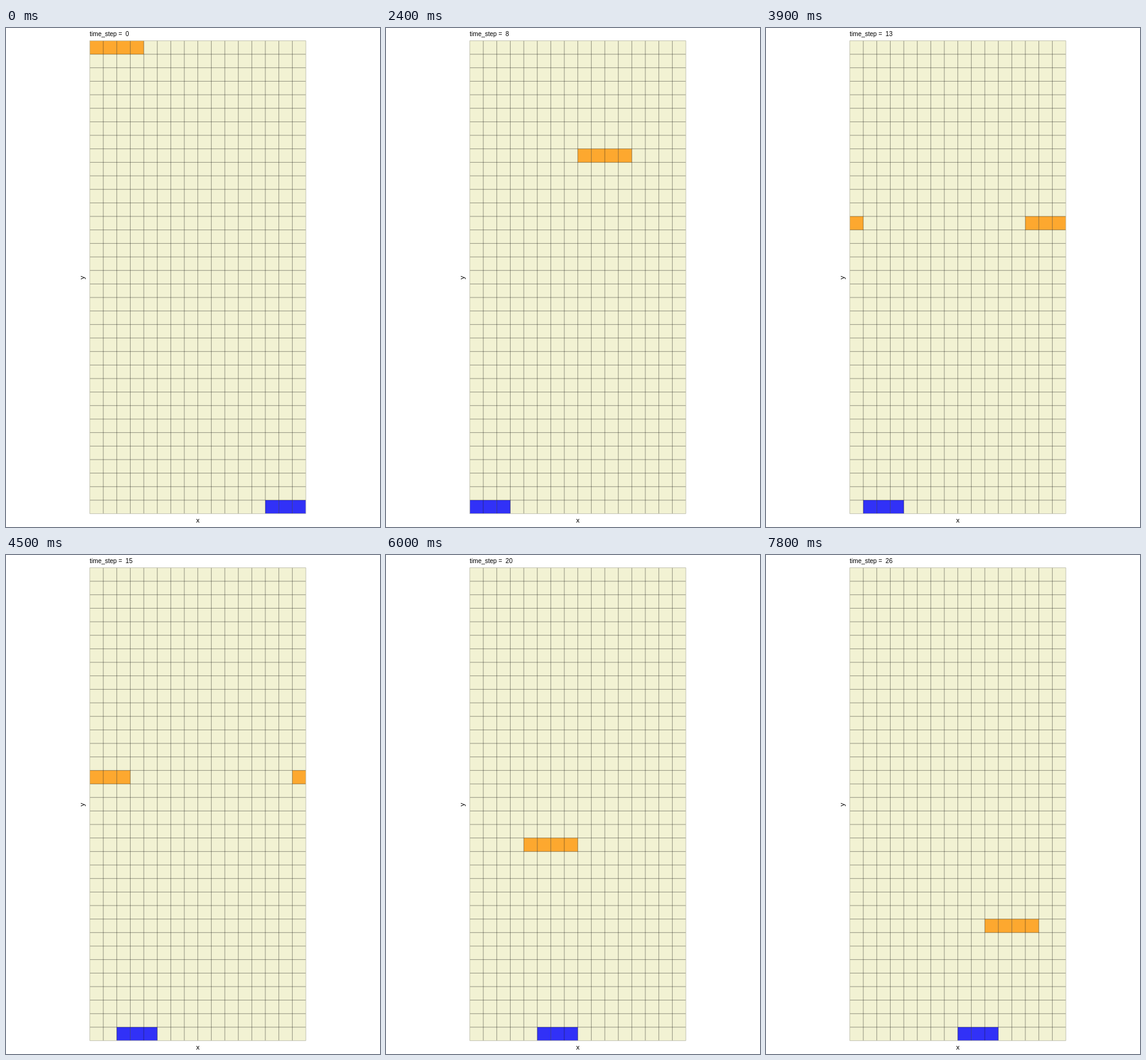
An HTML page for the animation above (8000 ms loop, 600x800 px).

```html
<!DOCTYPE html>
<html lang="en">
<head>
<meta charset="utf-8">
<title>Grid catch</title>
<style>
html, body { margin: 0; width: 100%; height: 100%; overflow: hidden; background: #fff; }
svg { display: block; width: 600px; height: 800px; }
text { font-family: "Liberation Sans", Arial, sans-serif; fill: #000; white-space: pre; }
</style>
</head>
<body>
<svg viewBox="0 0 600 800">
  <text id="label" x="134.3" y="13" font-size="10" xml:space="preserve"></text>
  <g id="cells"></g>
  <path id="grid" fill="none" stroke="#000" stroke-opacity=".42" stroke-width=".9"/>
  <path id="frame" fill="none" stroke="#b9b9a8" stroke-width=".8"/>
  <text x="307.7" y="793" font-size="11" text-anchor="middle">x</text>
  <text transform="translate(126 400.2) rotate(-90)" font-size="11" text-anchor="middle">y</text>
</svg>
<script>
const COLS = 16, ROWS = 35, SIZE = 21.664, LEFT = 134.4, TOP = 20.4;
const STEP = 300, LOOP = 8000;
const BALL = 4, PADDLE = 3;
// Paddle position at each step, wrapping at the grid width
const PATH = [13, 14, 15, 16, 16, 16, 16, 16, 16, 16, 16, 16, 17, 17, 18,
  18, 18, 19, 19, 20, 21, 21, 22, 22, 23, 23, 24];

const $ = id => document.getElementById(id);
const px = col => LEFT + col * SIZE;
const py = row => TOP + row * SIZE;

function addRect(fill, x, y, w, h) {
  const r = document.createElementNS("http://www.w3.org/2000/svg", "rect");
  const attrs = { fill, x, y, width: w, height: h };
  for (const k in attrs) r.setAttribute(k, attrs[k]);
  $("cells").append(r);
  return r;
}

function place(cells, col, row) {
  cells.forEach((cell, i) => {
    cell.setAttribute("x", px((col + i) % COLS));
    cell.setAttribute("y", py(row));
  });
}

const makeCells = (n, fill) =>
  Array.from({ length: n }, () => addRect(fill, 0, 0, SIZE, SIZE));

addRect("#f2f2d3", LEFT, TOP, COLS * SIZE, ROWS * SIZE);
const ball = makeCells(BALL, "#fda82f");
const paddle = makeCells(PADDLE, "#3131f7");

let lines = "";
for (let c = 1; c < COLS; c++) lines += `M${px(c)} ${TOP}V${py(ROWS)}`;
for (let r = 1; r < ROWS; r++) lines += `M${LEFT} ${py(r)}H${px(COLS)}`;
$("grid").setAttribute("d", lines);
$("frame").setAttribute("d", `M${LEFT} ${TOP}H${px(COLS)}V${py(ROWS)}H${LEFT}Z`);

let shown = -1;
function draw(ms) {
  const step = Math.min(Math.floor((ms % LOOP) / STEP), PATH.length - 1);
  if (step === shown) return;
  shown = step;
  $("label").textContent = `time_step =  ${step}`;
  place(ball, step, step);
  place(paddle, PATH[step], ROWS - 1);
}

const start = performance.now();
function tick() {
  draw(performance.now() - start);
  requestAnimationFrame(tick);
}
tick();
</script>
</body>
</html>
```
